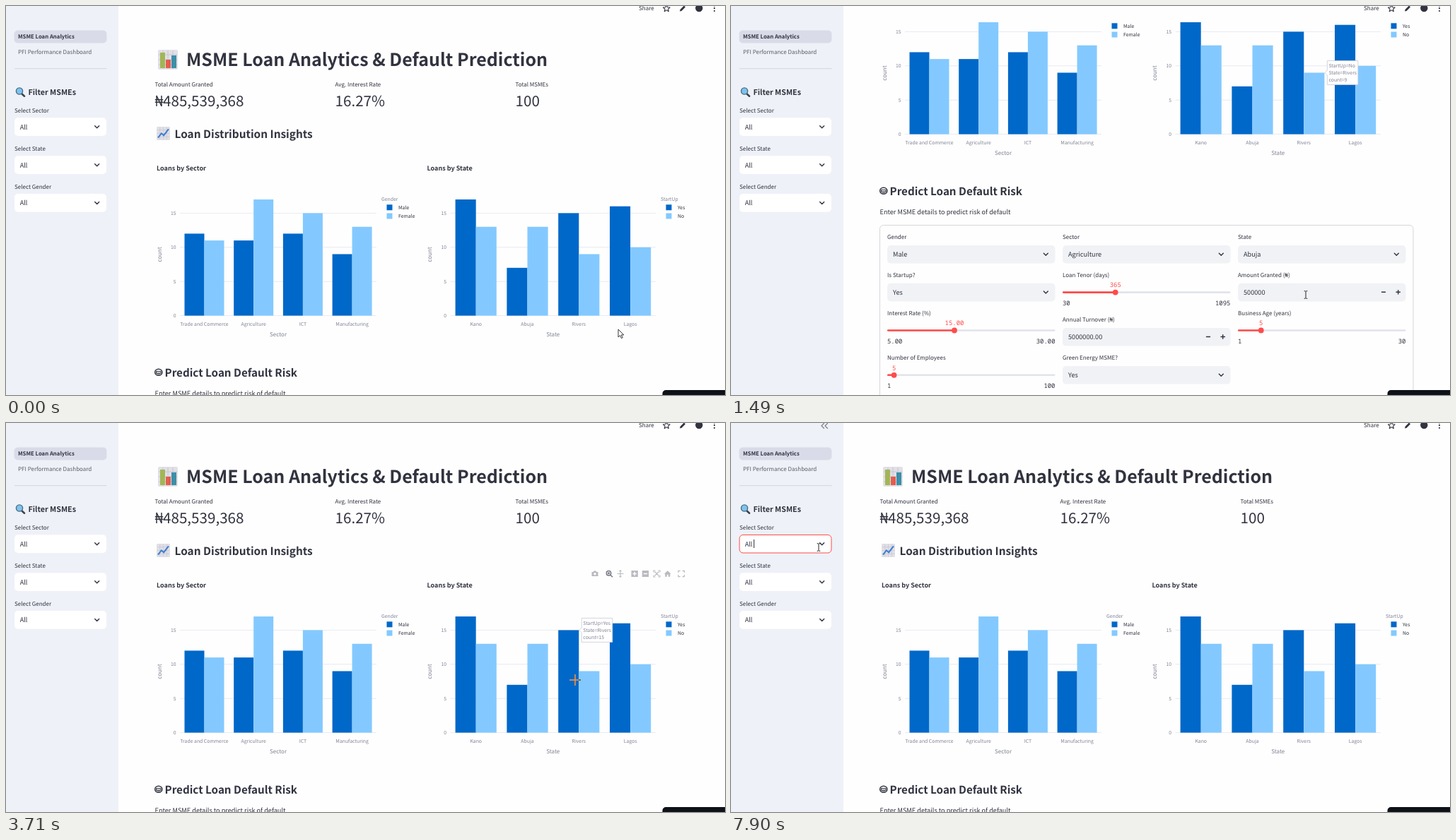
An HTML page that plays this animation: 1017 by 551 pixels, repeating every 8 s.

```html
<!DOCTYPE html>
<html lang="en">
<head>
<meta charset="utf-8">
<title>Loan dashboard</title>
<style>
  html, body { margin: 0; width: 100%; height: 100%; overflow: hidden; background: #fefefe; }
  svg { display: block; width: 1017px; height: 551px; }
  text {
    font-family: 'Noto Sans CJK SC', 'Noto Sans CJK JP', 'Noto Sans CJK', 'Noto Sans', sans-serif;
    fill: #31333f; text-rendering: geometricPrecision; white-space: pre;
  }
  .bold { font-weight: 700; }
  .gray { fill: #808495; }
  .mid { text-anchor: middle; }
  .end { text-anchor: end; }
  .mono { font-family: 'Noto Sans Mono', 'DejaVu Sans Mono', monospace; }
  .red { fill: #ff4b4b; }
  .line { fill: none; stroke: #31333f; stroke-width: 1.4; stroke-linecap: round; stroke-linejoin: round; }
  .tools { fill: none; stroke: #b9bac0; stroke-width: 1.5; }
  #cross { fill: none; stroke: #fff; stroke-width: 1.5; mix-blend-mode: difference; }
</style>
</head>
<body>
<svg id="stage" viewBox="0 0 1017 551" xmlns="http://www.w3.org/2000/svg"></svg>
<script>
const LOOP = 8000;
const DARK = '#0068c9', LIGHT = '#83c9ff', RED = '#ff4b4b', FIELD = '#f0f2f6';
const FONT_RATIO = 0.895;

// y is the middle of the capital letters
const text = (x, y, str, size = 8.96, cls = '', attrs = '') =>
  `<text x="${x}" y="${(y + size * 0.33).toFixed(2)}" font-size="${(size * FONT_RATIO).toFixed(2)}" class="${cls}" ${attrs}>${str}</text>`;
const mono = (x, y, str, cls = '') =>
  `<text x="${x}" y="${y + 3}" font-size="8.96" class="mono ${cls}">${str}</text>`;
const rect = (x, y, w, h, fill, attrs = '') =>
  `<rect x="${x}" y="${y}" width="${w}" height="${h}" fill="${fill}" ${attrs}/>`;
const path = (d, attrs = 'class="line"') => `<path d="${d}" ${attrs}/>`;
const group = (id, body, attrs = '') => `<g id="${id}" ${attrs}>${body}</g>`;
const chevron = (x, y) => path(`M${x - 3} ${y - 1.5}l3 3l3 -3`);

function chart({ left, right, centre, step, bar, names, series, title, axis, legendX, legend, labels }) {
  const base = 438.6, unit = 9.68;
  let out = text(left - 33, 230, title, 10.1, 'bold');
  for (const tick of [0, 5, 10, 15]) {
    const y = base - tick * unit;
    out += rect(left, y - 0.4, right - left, 0.8, '#e3e7ef') + text(left - 5.5, y, tick, 7.68, 'gray end');
  }
  names.forEach((name, i) => {
    const x = centre + i * step;
    series.forEach((counts, s) => {
      const h = counts[i] * unit;
      out += rect(x + (s - 1) * bar, base - h, bar, h, s ? LIGHT : DARK);
    });
    out += text(x, 450, name, 7.68, 'gray mid');
  });
  const countX = left - 29;
  out += text((left + right) / 2, 465.5, axis, 8.96, 'gray mid');
  out += text(countX, 352, 'count', 8.96, 'gray mid', `transform="rotate(-90 ${countX} 352)"`);
  out += text(legendX, 273.5, legend, 7.68, 'gray');
  labels.forEach((label, s) => {
    const y = 285.3 + s * 12.2;
    out += rect(legendX + 7.5, y - 4, 8, 8, s ? LIGHT : DARK) + text(legendX + 24, y, label, 7.68);
  });
  return out;
}

const fieldBox = (x, y, label, value) =>
  text(x, y, label) + rect(x, y + 11.5, 237.5, 25.6, FIELD, 'rx="5"') + text(x + 8, y + 24, value, 10.24);
const select = (x, y, label, value) => fieldBox(x, y, label, value) + chevron(x + 224.3, y + 24.3);
const numberInput = (x, y, label, value) => fieldBox(x, y, label, value) +
  path(`M${x + 203.5} ${y + 24}h5M${x + 224} ${y + 24}h5.4m-2.7 -2.7v5.4`);

function slider(x, y, label, min, max, value, digits = 0) {
  const width = 237.5, done = (value - min) / (max - min) * width, track = y + 24.3;
  return text(x, y, label) + mono(x + done, y + 14, value.toFixed(digits), 'mid red') +
    rect(x, track - 1.3, width, 2.6, '#e1e4ec', 'rx="1.3"') + rect(x, track - 1.3, done, 2.6, RED, 'rx="1.3"') +
    `<circle cx="${x + done}" cy="${track}" r="3.9" fill="${RED}"/>` +
    mono(x, y + 39.3, min.toFixed(digits)) + mono(x + width, y + 39.3, max.toFixed(digits), 'end');
}

function chartIcon(x, y, size, marks) {
  let grid = '';
  for (const k of [7, 14, 21]) grid += `M${k} 1V27M1 ${k}H27`;
  return `<g transform="translate(${x} ${y}) scale(${size / 28})">` +
    rect(0, 0, 28, 28, '#e2e0e6', 'rx="2"') + path(grid, 'stroke="#c3c6d4" fill="none"') + marks + '</g>';
}

function tooltip(id, x, y, lines) {
  const box = path(`M${x + 0.5} ${y}l3.5 -3.5V${y - 17}h43.5v34h-43.5v-13.5z`,
    'fill="#fff" stroke="#c9cbd4" stroke-width=".8"');
  return group(id, box + lines.map((s, i) => text(x + 6, y - 10 + i * 10, s, 7.68, 'gray')).join(''));
}

const toolbar = group('toolbar',
  path('M828.5 211h2l1 -1.5h3l1 1.5h2v6h-9z', 'fill="#b9bac0" stroke="none"') +
  '<circle cx="833" cy="213.8" r="1.8" fill="#fefefe" stroke="none"/>' +
  '<circle cx="852.5" cy="212.8" r="3.2" stroke="#777982"/>' +
  path('M855 215.3l3 3M851 212.8h3m-1.5 -1.5v3', 'stroke="#777982"') +
  path('M869 209v9m-4.5 -4.5h9M867.5 210.2l1.5 -1.5l1.5 1.5m-3 6.6l1.5 1.5l1.5 -1.5', 'stroke-width="1.1"') +
  rect(884.5, 209, 9.3, 9, '#b9bac0', 'stroke="none"') + path('M886.5 213.5h5.4m-2.7 -2.7v5.4', 'stroke="#fff"') +
  rect(899.8, 209, 9.3, 9, '#b9bac0', 'stroke="none"') + path('M901.8 213.5h5.4', 'stroke="#fff"') +
  path('M916 211.5v-2.5h2.5m4 0h2.5v2.5m0 4v2.5h-2.5m-4 0h-2.5v-2.5M917.5 210.5l6 6m0 -6l-6 6', 'stroke-width="1.1"') +
  path('M931 213.7l4.8 -4.5l4.8 4.5h-1.3v4h-2.5v-3h-2v3h-2.5v-4z', 'fill="#b9bac0" stroke="none"') +
  path('M951 212v-2.7h2.7m3 0h2.7v2.7m0 3v2.7h-2.7m-3 0h-2.7v-2.7', 'stroke-width="1.2"'),
  'class="tools"');

const page = group('page',
  chartIcon(215, 62, 28,
    rect(3, 4, 7, 22, '#a2b656') + rect(11, 14, 7, 12, '#e35d4f') + rect(19, 8, 7, 18, '#3c8fa8')) +
  text(255, 76, 'MSME Loan Analytics &amp; Default Prediction', 27.9, 'bold') +
  text(210.5, 111, 'Total Amount Granted') + text(465.5, 111, 'Avg. Interest Rate') + text(720.5, 111, 'Total MSMEs') +
  path('M213 142V127l7 15V127M210.8 132.7h11.4M210.8 136.3h11.4', 'fill="none" stroke="#31333f" stroke-width="1.5"') +
  text(222, 134.5, '485,539,368', 23.05) + text(465.5, 134.5, '16.27%', 23.05) + text(720.5, 134.5, '100', 23.05) +
  chartIcon(213, 171, 19, path('M3 23L10 14L15 18L25 5', 'fill="none" stroke="#3f7fd0" stroke-width="3"')) +
  text(238.5, 181, 'Loan Distribution Insights', 17.2, 'bold') +
  chart({
    left: 246, right: 524, centre: 280.5, step: 69.7, bar: 28,
    names: ['Trade and Commerce', 'Agriculture', 'ICT', 'Manufacturing'],
    series: [[12, 11, 12, 9], [11, 17, 15, 13]],
    title: 'Loans by Sector', axis: 'Sector', legendX: 531, legend: 'Gender', labels: ['Male', 'Female']
  }) +
  chart({
    left: 628.5, right: 919, centre: 664.7, step: 72.8, bar: 29.1,
    names: ['Kano', 'Abuja', 'Rivers', 'Lagos'],
    series: [[17, 7, 15, 16], [13, 13, 9, 10]],
    title: 'Loans by State', axis: 'State', legendX: 926, legend: 'StartUp', labels: ['Yes', 'No']
  }) +
  toolbar +
  tooltip('tipNo', 839.4, 351.5, ['StartUp=No', 'State=Rivers', 'count=9']) +
  tooltip('tipYes', 810.3, 293.4, ['StartUp=Yes', 'State=Rivers', 'count=15']) +
  '<ellipse cx="215.8" cy="518.8" rx="5.2" ry="4.6" class="line"/>' +
  path('M212.5 517.5h6.6v2.6h-6.6zM214 522h3.6', 'class="line" style="stroke-width:1.1"') +
  text(224.5, 519, 'Predict Loan Default Risk', 17, 'bold') +
  text(210.5, 548.5, 'Enter MSME details to predict risk of default', 10.24) +
  rect(210.5, 567.5, 754.5, 300, 'none', 'rx="5" stroke="#d6d7db"') +
  select(221, 584.5, 'Gender', 'Male') +
  select(469, 584.5, 'Sector', 'Agriculture') +
  select(717, 584.5, 'State', 'Abuja') +
  select(221, 638.3, 'Is Startup?', 'Yes') +
  slider(469, 638.3, 'Loan Tenor (days)', 30, 1095, 365) +
  numberInput(717, 638.3, 'Amount Granted (₦)', '500000') +
  slider(221, 692.2, 'Interest Rate (%)', 5, 30, 15, 2) +
  numberInput(469, 701.5, 'Annual Turnover (₦)', '5000000.00') +
  slider(717, 692.2, 'Business Age (years)', 1, 30, 5) +
  slider(221, 755.5, 'Number of Employees', 1, 100, 5) +
  select(469, 755.5, 'Green Energy MSME?', 'Yes'));

const header = rect(159, 0, 858, 23, '#fefefe') +
  text(895, 3.5, 'Share') +
  path('M934.3 -1.5l1.4 3.2l3.4 .3l-2.6 2.3l.8 3.4l-3 -1.8l-3 1.8l.8 -3.4l-2.6 -2.3l3.4 -.3z', 'class="line" style="stroke-width:1.1"') +
  path('M953 7.5l.6 -2.6l5.4 -5.4l2 2l-5.4 5.4z', 'fill="#31333f"') +
  '<circle cx="980.3" cy="3" r="5.2" fill="#31333f"/>' +
  [-0.6, 3.2, 7].map(y => `<circle cx="1002" cy="${y}" r="1.1" fill="#31333f"/>`).join('');

const sidebarSelect = (label, y) =>
  text(12, y, label) + rect(12, y + 10.3, 130, 25.7, '#fff', 'rx="5"') +
  text(19.7, y + 23.2, 'All', 10.24) + chevron(128.7, y + 23.3);

const sidebar = rect(0, 0, 159, 551, '#eef1f7') +
  rect(11.5, 34.5, 131, 18, '#d9dce8', 'rx="5"') +
  text(17, 43.5, 'MSME Loan Analytics', 8.65, 'bold') +
  `<g opacity=".78">${text(17, 65.3, 'PFI Performance Dashboard')}</g>` +
  rect(12, 88.2, 130.5, 1, '#d3d6de') +
  path('M22.5 124.5l3.5 3.2', 'stroke="#3b4450" stroke-width="2.6" stroke-linecap="round"') +
  '<circle cx="19" cy="120.5" r="4.6" fill="#7cc4f0" stroke="#4d6a80" stroke-width="1.4"/>' +
  text(31.5, 122, 'Filter MSMEs', 12, 'bold') +
  sidebarSelect('Select Sector', 148) + sidebarSelect('Select State', 202) + sidebarSelect('Select Gender', 255.8) +
  group('collapse', path('M131.5 0.5l-3.5 3.5l3.5 3.5M136.5 0.5l-3.5 3.5l3.5 3.5', 'class="line" style="stroke:#7d808c;stroke-width:1.2"')) +
  group('focus', rect(12, 158.5, 130, 25.5, 'none', `rx="5" stroke="${RED}"`)) +
  group('caret', rect(32, 165, 1, 12, '#31333f'));

const options = ['All', 'Trade and Commerce', 'Agriculture', 'ICT', 'Manufacturing'];
const menu = group('menu',
  rect(12, 187, 130, 128.5, '#fff', 'rx="5" style="filter:drop-shadow(0 1px 2px #0002)"') +
  rect(12, 187, 130, 25.7, FIELD, 'id="hover"') +
  options.map((name, i) => text(19.7, 199.8 + i * 25.7, name, 10.24)).join(''));

const cursors = group('arrow',
    path('M0 0v11l2.6 -2.4l1.8 4l1.8 -.8l-1.8 -3.9h3.4z', 'fill="#fff" stroke="#222" stroke-width=".9"')) +
  group('ibeam', path('M-2.3 -5.3h1.6l.7 .7l.7 -.7h1.6M0 -4.6v9.2M-2.3 5.3h1.6l.7 -.7l.7 .7h1.6', 'fill="none" stroke="#222" stroke-width="1"')) +
  group('hand', path('M-1 -5.5q1.2 -1.2 2 0v4l4 1q1 .4 .8 1.6l-.8 4.4h-5l-3.6 -4.2q.2 -1.6 1.6 -.8l1 .8z', 'fill="#fff" stroke="#222" stroke-width=".9"')) +
  path('M-8 0h16M0 -8v16', 'id="cross"');

document.getElementById('stage').innerHTML =
  rect(0, 0, 1017, 551, '#fefefe') + page + header + sidebar + menu +
  rect(928.5, 544, 100, 20, '#0e1117', 'rx="5"') + cursors;

// [time, scroll offset]
const scrollSteps = [[0, 0], [1010, 28], [1110, 68], [1190, 102], [1280, 138], [1400, 220], [1490, 257],
  [3410, 225], [3490, 150], [3560, 90], [3640, 28], [3710, 0]];

// [time, x, y, cursor kind]
const pointerSteps = [
  [0, 866, 458, 'arrow'], [70, 827, 423, 'cross'], [220, 814, 410, 'cross'], [470, 813, 409, 'cross'],
  [1490, 813, 409, 'ibeam'], [3330, 802, 398.5, 'ibeam'], [3490, 803, 386, 'arrow'], [3640, 804, 373, 'cross'],
  [3710, 805, 364, 'cross'], [4360, 780, 352, 'cross'], [4440, 700, 322, 'arrow'], [4520, 590, 285, 'arrow'],
  [4610, 450, 245, 'arrow'], [4700, 310, 212, 'arrow'], [4780, 200, 190, 'arrow'], [4870, 130, 172, 'ibeam'],
  [4960, 103, 165, 'ibeam'], [5120, 98, 163, 'ibeam'], [5300, 101, 166, 'ibeam'], [5560, 112, 174, 'ibeam'],
  [5740, 120, 180, 'ibeam'], [6020, 127, 185, 'hand'], [6110, 128, 185, 'hand'], [6530, 126, 193, 'hand'],
  [6620, 122, 204, 'hand'], [6760, 118, 215, 'hand'], [6930, 117, 224, 'hand'], [7120, 118, 225, 'ibeam'],
  [7300, 118, 220, 'ibeam'], [7400, 119, 210, 'arrow'], [7500, 120, 201, 'arrow'], [7600, 122, 192, 'arrow'],
  [7700, 123, 183, 'ibeam'], [7900, 124, 176, 'ibeam']];

const el = id => document.getElementById(id);
const show = (id, on) => el(id).setAttribute('visibility', on ? 'visible' : 'hidden');
const stepAt = (steps, t) => steps.findLast(step => step[0] <= t);

function draw(t) {
  const within = (from, to) => t >= from && t < to;
  const [, x, y, kind] = stepAt(pointerSteps, t);
  el('page').setAttribute('transform', `translate(0 ${-stepAt(scrollSteps, t)[1]})`);
  for (const id of ['arrow', 'ibeam', 'hand', 'cross']) {
    el(id).setAttribute('transform', `translate(${x} ${y})`);
    show(id, id === kind);
  }
  show('toolbar', within(70, 4440));
  show('tipNo', within(220, 3710));
  show('tipYes', within(3710, 4440));
  show('collapse', t >= 4780);
  show('focus', t >= 5390);
  show('caret', t >= 5390 && Math.floor((t - 5390) / 530) % 2 === 0);
  show('menu', within(5390, 7120));
  el('hover').setAttribute('y', 187 + (within(6760, 7120) ? 25.7 : 0));
}

const start = performance.now();
function tick() {
  draw((performance.now() - start) % LOOP);
  requestAnimationFrame(tick);
}
tick();
</script>
</body>
</html>
```
